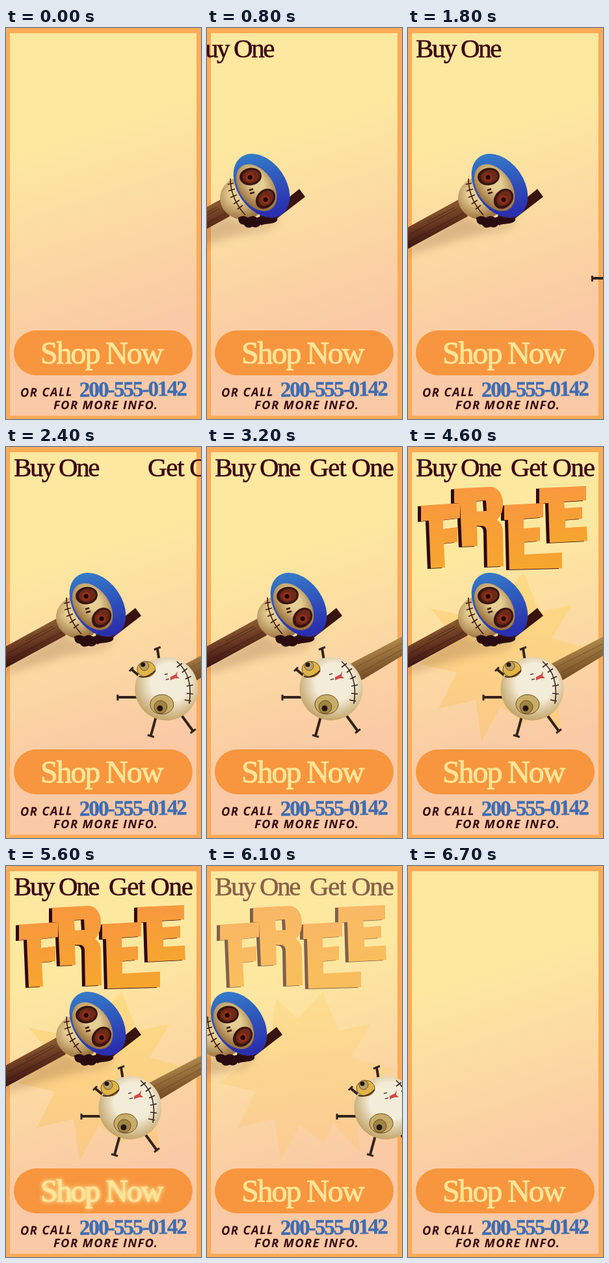
An HTML page that plays this animation: 300 by 600 pixels, repeating every 6.8 s.

```html
<!DOCTYPE html>
<html lang="en">
<head>
<meta charset="utf-8">
<style>
html, body { margin: 0; width: 100%; height: 100%; overflow: hidden; }
svg { display: block; }
.title { font: 41px "Liberation Serif", serif; fill: #3b0710; stroke: #3b0710; stroke-width: .6; }
.shop { font: 48px "Liberation Serif", serif; letter-spacing: -2.1px; fill: #fde598; stroke: #fde598; stroke-width: 1; }
.info { font: italic 700 18.5px "Open Sans", sans-serif; letter-spacing: 1.3px; fill: #360a10; }
.phone { font: bold 33px "Liberation Serif", serif; letter-spacing: -1.9px; fill: #3d6db4; stroke: #3d6db4; stroke-width: .5; }
.glow { filter: drop-shadow(0 0 3px #ffffbe); }
</style>
</head>
<body>
<svg width="300" height="600" viewBox="0 0 300 600">
  <defs>
    <linearGradient id="sky" x1=".42" y1="0" x2=".58" y2="1">
      <stop offset=".25" stop-color="#fde8a0"/><stop offset=".8" stop-color="#fac9a5"/>
    </linearGradient>
    <linearGradient id="gold" x1="0" y1="0" x2="0" y2="1">
      <stop offset="0" stop-color="#f8983f"/><stop offset="1" stop-color="#f6a62e"/>
    </linearGradient>
    <linearGradient id="burst" x1="0" y1="0" x2="0" y2="1">
      <stop offset="0" stop-color="#fddb83"/><stop offset="1" stop-color="#fbc888"/>
    </linearGradient>
    <linearGradient id="darkWood" x1="0" y1="0" x2=".35" y2="1">
      <stop offset=".35" stop-color="#86562f"/><stop offset=".65" stop-color="#5c2c1c"/><stop offset="1" stop-color="#2b0a0c"/>
    </linearGradient>
    <linearGradient id="lightWood" x1="0" y1="0" x2=".4" y2="1">
      <stop offset=".2" stop-color="#c09a58"/><stop offset="1" stop-color="#6b421d"/>
    </linearGradient>
    <linearGradient id="blue" x1="0" y1="0" x2="1" y2=".3">
      <stop offset="0" stop-color="#3585cc"/><stop offset="1" stop-color="#2a2fae"/>
    </linearGradient>
    <radialGradient id="bone" cx=".4" cy=".4" r=".6">
      <stop offset=".3" stop-color="#e6cf94"/><stop offset="1" stop-color="#9c7340"/>
    </radialGradient>
    <radialGradient id="pale" cx=".55" cy=".4" r=".6">
      <stop offset=".5" stop-color="#f3ecd8"/><stop offset="1" stop-color="#c3a56a"/>
    </radialGradient>
    <filter id="soft" x="-30%" y="-30%" width="160%" height="160%"><feGaussianBlur stdDeviation="7"/></filter>
    <g id="letters" fill-rule="evenodd">
      <path d="M20 90L80 86V109L54 112V126L76 123V146L55 148L57 185L35 186L32 113L20 114Z"/>
      <path d="M71 64L128 61Q144 64 146 84Q147 102 137 112Q146 117 146 130L147 183L122 184L121 130Q121 121 113 121H106L107 152L83 153L80 86H71ZM105 83L120 82L121 98L106 99Z"/>
      <path d="M148 89L208 86V108L178 110V125L203 123V144L179 146V165L237 162V186L156 188L154 112H148Z"/>
      <path d="M202 63L274 60V82L240 84L241 94L268 92V110L242 112V124L275 122L276 144L218 147L216 86L202 87Z"/>
    </g>
  </defs>

  <rect width="300" height="600" fill="#fcab56"/>
  <rect x="6" y="8" width="287" height="587" fill="url(#sky)"/>

  <g id="offer">
    <path fill="url(#burst)" d="M106 203L139 234L178 193L202 253L252 242L221 294L290 312L226 346L236 440L194 395L180 425L143 398L113 452L104 388L47 402L75 346L17 333L73 294L35 248L98 261Z"/>
    <use href="#letters" x="-5" y="1" fill="#2e0712"/>
    <use href="#letters" fill="url(#gold)"/>
  </g>

  <g id="leftBat">
    <path d="M0 335L85 285L130 305L175 285L150 310L95 320L0 348Z" fill="#7a4a30" opacity=".25" filter="url(#soft)"/>
    <path d="M138 288L163 276L199 247L208 259L165 292L140 303Z" fill="#38130f"/>
    <path d="M-4 308L80 262L92 289L-4 341Z" fill="url(#darkWood)"/>
    <path d="M4 316L76 277M0 329L86 284M30 297L72 275" stroke="#32130e" opacity=".6"/>
    <ellipse cx="113" cy="261" rx="36" ry="33" fill="url(#bone)"/>
    <path d="M105 291q8-5 15 0q8-5 14 0q8-3 13 1l18 0q2 6-10 8l-16 2q-5 6-12 3q-9 4-13-3q-9 0-9-11" fill="#2a0c10"/>
    <ellipse cx="141" cy="242" rx="54" ry="37" transform="rotate(55 141 242)" fill="url(#blue)"/>
    <ellipse cx="133" cy="245" rx="40" ry="26" transform="rotate(55 133 245)" fill="url(#bone)"/>
    <g id="darkEye" transform="translate(124 228) rotate(-8)">
      <ellipse rx="17" ry="13.5" fill="#3a1510"/><ellipse cx="1" rx="13" ry="10" fill="#6d2a18"/>
      <circle cx="-1" cy="1" r="7" fill="#8e2e1a"/><circle cx="-1" cy="1" r="3.5" fill="#1d0606"/>
    </g>
    <use href="#darkEye" transform="rotate(-40 147 262) translate(23 34)"/>
    <path d="M122 249l6-2M123 254l7-2" stroke="#451810" stroke-width="2.5"/>
    <path d="M93 231Q93 262 116 287M89 240l9-2M90 250l10-3M93 260l10-4M98 270l9-6M104 278l8-6" fill="none" stroke="#43180f" stroke-width="1.6"/>
  </g>

  <g id="rightBat">
    <path d="M218 334L304 289V318L236 359Z" fill="url(#lightWood)"/>
    <path d="M228 338L304 300M236 346L304 309" stroke="#5b3518" opacity=".5"/>
    <g stroke="#33231c" stroke-width="4">
      <path d="M180 328L177 309M147 384H117M175 414L167 443M213 410L232 436M150 352L137 341"/>
      <path d="M172 311L182 307M116 380V389M162 442L172 445M228 439L236 433M134 344L140 338" stroke-width="3"/>
    </g>
    <circle cx="191" cy="371" r="48.5" fill="url(#pale)"/>
    <g stroke="#6b4b22">
      <ellipse cx="160" cy="341" rx="14" ry="12" fill="#e0b548"/><circle cx="157" cy="336" r="7" fill="#b8a16a"/>
      <ellipse cx="184" cy="395" rx="18" ry="15" fill="#c8ad68"/><circle cx="182" cy="399" r="10" fill="#a08544"/>
    </g>
    <circle cx="155" cy="334" r="3.5" fill="#24150d"/><circle cx="181" cy="401" r="4.5" fill="#24150d"/>
    <path d="M149 352Q162 356 174 343" fill="none" stroke="#4d2b16" stroke-width="2"/>
    <path d="M197 353l8-4l3-5l-1 7l4 4l-7 0l-7 3" fill="#cf4a45"/>
    <path d="M188 349l5-1M190 357l5-1" stroke="#5b3a28" stroke-width="1.5"/>
    <path d="M207 329Q233 351 226 394M207 338l8-6M215 346l8-6M220 356l9-4M222 367l10-2M222 378l10 1M219 388l10 2" fill="none" stroke="#38201a" stroke-width="1.6"/>
  </g>

  <text id="buy" class="title" y="45" x="12" letter-spacing="-2.4">Buy One</text>
  <text id="get" class="title" y="45" x="158" letter-spacing="-1.3">Get One</text>

  <rect x="12" y="464" width="275" height="69" rx="34.5" fill="#f7963e"/>
  <text id="shop" class="shop" x="53" y="515">Shop Now</text>
  <text class="info" x="22" y="566" transform="rotate(-1 22 566)">OR CALL</text>
  <text class="phone" x="113" y="566" transform="rotate(-.7 113 566)">200-555-0142</text>
  <text class="info" x="73" y="585">FOR MORE INFO.</text>
</svg>
<script>
const el = id => document.getElementById(id);
const [buy, get, shop, offer, leftBat, rightBat] =
  ["buy", "get", "shop", "offer", "leftBat", "rightBat"].map(el);
const slide = (node, x) => node.setAttribute("transform", `translate(${x} 0)`);

function draw(now) {
  const tick = Math.floor(now % 6800 / 100);
  // Every move is linear and takes ten ticks of 100 ms.
  const ramp = start => Math.min(1, Math.max(0, (tick - start) / 10));
  const left = 1 - ramp(0), right = 1 - ramp(17), exit = ramp(57);

  slide(buy, -200 * left);
  slide(leftBat, -285 * left - 230 * exit);
  slide(get, 200 * right);
  slide(rightBat, 186 * right + 210 * exit);
  buy.style.opacity = get.style.opacity = 1 - exit;
  offer.style.opacity = ramp(34) - exit;
  shop.classList.toggle("glow", tick >= 44 && tick < 58 && tick % 4 < 2);
}

const start = performance.now();
function loop() {
  draw(performance.now() - start);
  requestAnimationFrame(loop);
}
loop();
</script>
</body>
</html>
```
